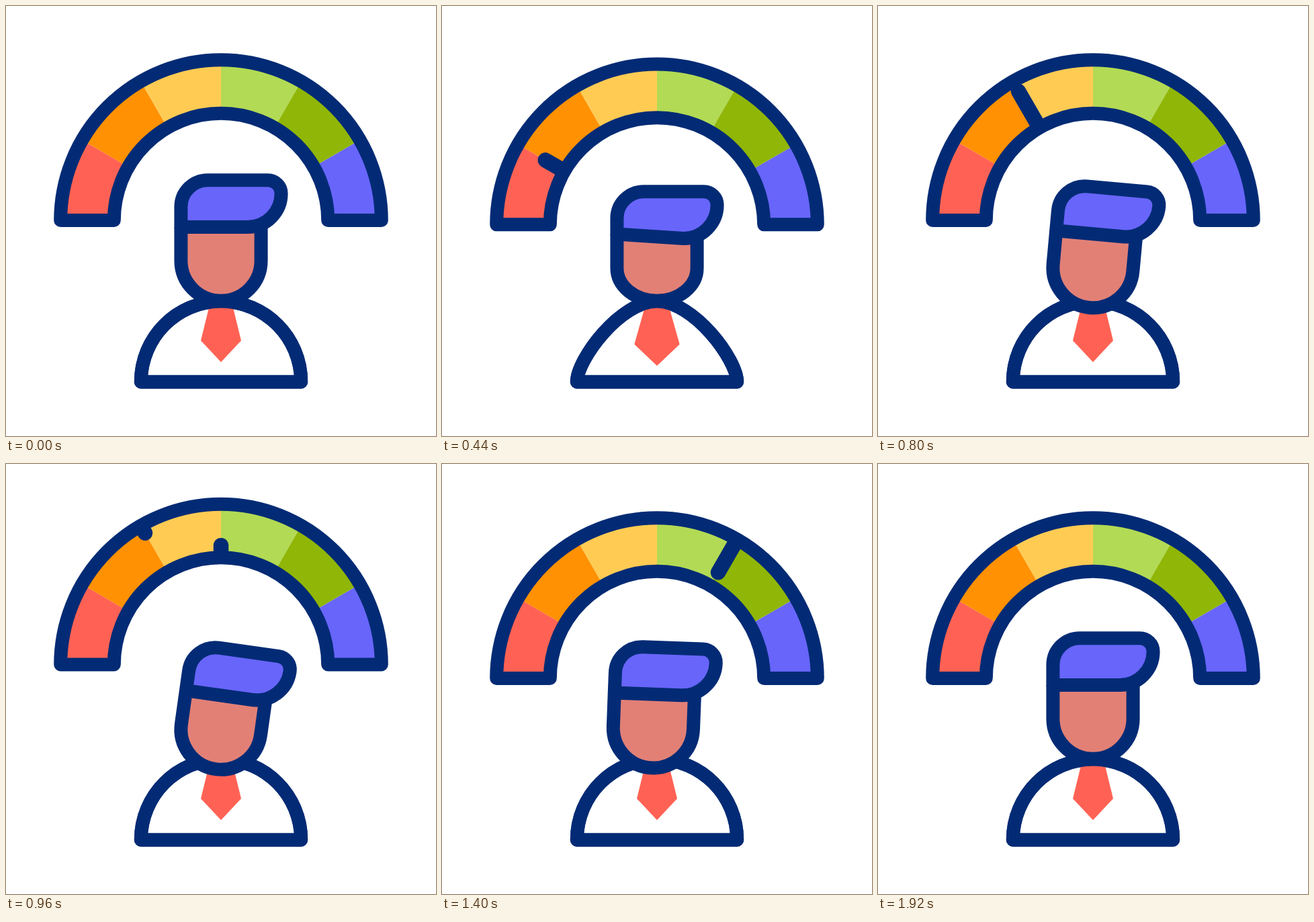
These frames come from a looping animation (640 by 640 pixels, 2000 ms). An HTML page with a canvas:

```html
<!DOCTYPE html>
<html lang="en">
<head>
<meta charset="utf-8">
<title>Mood gauge</title>
<style>
html, body { margin: 0; width: 100%; height: 100%; overflow: hidden; background: #fff; }
canvas { display: block; width: 100vmin; height: 100vmin; margin: auto; }
</style>
</head>
<body>
<canvas id="stage" width="640" height="640"></canvas>
<script>
const ctx = document.getElementById('stage').getContext('2d');
const LOOP = 2000, STEP = 40;
const NAVY = '#032b75', RED = '#ff6254', PURPLE = '#6865fa', SKIN = '#e28076';
const BANDS = [RED, '#ff9102', '#ffcb53', '#b2da54', '#90b607', PURPLE];
const OUTER = 238.8, INNER = 159.2, LINE = 20;

const ease = u => (1 - Math.cos(Math.PI * Math.min(1, Math.max(0, u)))) / 2;
const mix = (a, b, u) => a + (b - a) * u;

// Eased value at time t from [time, value] keys
function track(t, keys) {
  let value = keys[0][1];
  for (let i = 1; i < keys.length; i++) {
    const [t0, a] = keys[i - 1], [t1, b] = keys[i];
    if (t >= t0) value = mix(a, b, ease((t - t0) / (t1 - t0)));
  }
  return value;
}

function shape(d, fill, line = true) {
  const path = new Path2D(d);
  ctx.fillStyle = fill;
  ctx.fill(path);
  if (!line) return;
  ctx.strokeStyle = NAVY;
  ctx.lineWidth = LINE;
  ctx.stroke(path);
}

// A mark that grows outward along a band edge, then leaves at the rim
function tick(t, i) {
  const start = 308 + i * 280;
  const tip = ease((t - start) / 300), tail = ease((t - start - 146) / 300);
  if (tip <= 0 || tail >= 1) return;
  const a = Math.PI * (1 + (i + 1) / 6);
  const r0 = mix(161, 237, tail), r1 = mix(161, 237, tip);
  ctx.beginPath();
  ctx.moveTo(r0 * Math.cos(a), r0 * Math.sin(a));
  ctx.lineTo(r1 * Math.cos(a), r1 * Math.sin(a));
  ctx.strokeStyle = NAVY;
  ctx.lineWidth = 22.5;
  ctx.stroke();
}

function gauge(t) {
  ctx.save();
  ctx.translate(320, 319 + track(t, [[320, 0], [640, 20.5], [960, -20.5], [1200, 0]]));
  ctx.lineCap = 'butt';
  ctx.lineWidth = OUTER - INNER;
  BANDS.forEach((color, i) => {
    ctx.beginPath();
    ctx.arc(0, 0, (OUTER + INNER) / 2, Math.PI * (1 + i / 6), Math.PI * (1 + (i + 1) / 6));
    ctx.strokeStyle = color;
    ctx.stroke();
  });
  ctx.lineCap = 'round';
  for (let i = 0; i < 5; i++) tick(t, i);
  shape(`M${-OUTER} 0A${OUTER} ${OUTER} 0 0 1 ${OUTER} 0H${INNER}
    A${INNER} ${INNER} 0 0 0 ${-INNER} 0Z`, 'transparent');
  ctx.restore();
}

function body(s) {
  const low = 559.5 - mix(66, 33, s), high = mix(66, 55, s);
  const dome = `M200.8 559.5C200.8 ${low} ${320 - high} 439.5 320 439.5
    S439.2 ${low} 439.2 559.5Z`;
  shape(dome, '#fff');
  const w = 30 + 3.7 * s, y = 498 + 5.5 * s;
  shape(`M304.5 439H335.5L${320 + w} ${y}L320 ${y + 32}L${320 - w} ${y}Z`, RED, false);
  shape(dome, 'transparent');
}

function head(t, s) {
  const dx = track(t, [[960, 0], [1240, -9.5], [1600, 0]]);
  const dy = track(t, [[560, 0], [960, 16], [1240, 15.2], [1600, 11.5], [1920, 0]]);
  const tilt = track(t, [[560, 0], [960, 8], [1240, -0.5], [1600, 6], [1920, 0]]);
  ctx.save();
  ctx.translate(320 + dx, 379 + dy);
  ctx.rotate(tilt * Math.PI / 180);
  ctx.translate(-320, -379);
  const left = 329 + 10.5 * s, drop = 17 * s, jaw = 379 + 11 * s;
  shape(`M260.4 ${left}V${jaw}A59.6 ${438.7 - jaw} 0 0 0 379.6 ${jaw}V${left}`, SKIN);
  shape(`M260.4 ${left}V${299 + drop}A39.8 39.8 0 0 1 300.2 ${259.2 + drop}
    H389.7A19.9 19.9 0 0 1 409.6 ${279.1 + drop}
    A49.8 49.8 0 0 1 359.8 ${329 + drop}Z`, PURPLE);
  ctx.restore();
}

function draw(now) {
  const t = Math.floor(now % LOOP / STEP) * STEP;
  const squash = track(t, [[100, 0], [440, 1], [620, 0]]);
  ctx.fillStyle = '#fff';
  ctx.fillRect(0, 0, 640, 640);
  ctx.lineJoin = 'round';
  gauge(t);
  body(squash);
  head(t, squash);
}

const begin = performance.now();
function frame() {
  draw(performance.now() - begin);
  requestAnimationFrame(frame);
}
frame();
</script>
</body>
</html>
```
